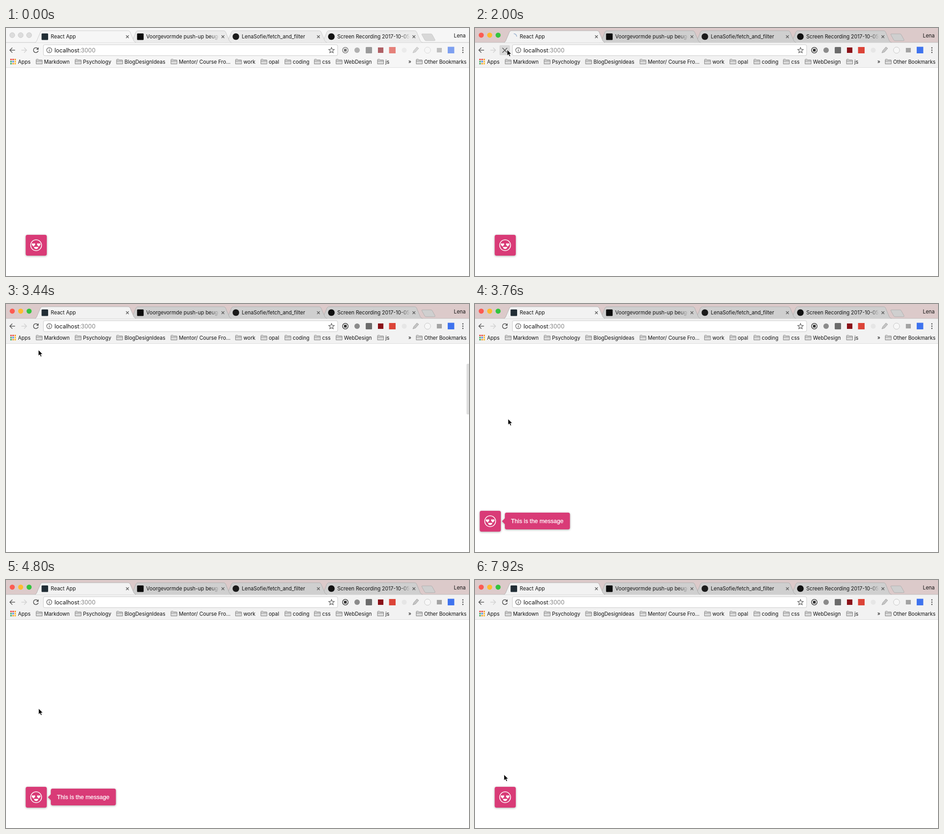
Recreate the animation shown at these times as an HTML page. Size 1022 px wide and 548 px high, loop 8 s.

```html
<!DOCTYPE html>
<html lang="en">
<head>
<meta charset="utf-8">
<title>React App</title>
<style>
  html, body { margin: 0; width: 100%; height: 100%; overflow: hidden; background: #fff; }
  svg { display: block; width: 1022px; height: 548px; }
  text { font: 11.35px Inter, Roboto, sans-serif; fill: #111; white-space: pre; }
  #strip { fill: #dccaca; }
  .tab { fill: #cfcfcf; stroke: #a6a6a6; stroke-width: .8; }
  .tab.on, #bar { fill: #f2f2f2; }
  .fade { stop-color: #cfcfcf; }
  .blur #strip { fill: #f6f6f6; }
  .blur .tab { fill: #ebebeb; stroke: #c2c2c2; }
  .blur .tab.on, .blur #bar { fill: #f6f6f6; }
  .blur .fade { stop-color: #ebebeb; }
  .blur .light { fill: #dcdcdc; stroke: #cbcbcb; }
  .blur #newTab { fill: #d8d8d8; }
  .blur #tools { opacity: .65; }
  .line { fill: none; stroke: #5a5a5a; stroke-width: 1.6; }
  .pink { fill: #d93b77; }
  #widget { filter: drop-shadow(0 1px 2px rgba(0, 0, 0, .35)); }
  #message text { font: 13px "Liberation Sans", Arial, sans-serif; fill: #fff; stroke: #fff; stroke-width: .3px; }
</style>
</head>
<body>
<svg id="stage" viewBox="0 0 1022 548">
  <defs>
    <linearGradient id="fadeOut">
      <stop class="fade" offset="0" stop-opacity="0"/>
      <stop class="fade" offset="1"/>
    </linearGradient>
    <path id="heart" d="M0 4.2C-2 2.4-3.8 .9-3.8-.9C-3.8-3.2-1-3.7 0-1.6C1-3.7 3.8-3.2 3.8-.9C3.8 .9 2 2.4 0 4.2Z" fill="#fff"/>
  </defs>
  <rect width="1022" height="548" fill="#fff"/>

  <rect id="strip" width="1022" height="32"/>
  <rect id="bar" y="32" width="1022" height="55"/>
  <path d="M0 32H1022" stroke="#b4b4b4" stroke-width=".8"/>
  <path d="M0 87.5H1022" stroke="#dedede"/>
  <g id="lights"></g>
  <g id="tabs"></g>
  <path id="newTab" class="tab" d="M919 13H938Q940 13 941 15L947 26Q948 28 945 28H927Q925 28 924 26L918 15Q917 13 919 13Z"/>
  <text x="988.5" y="20.5">Lena</text>

  <path class="line" d="M20 49H9M14 43.5L8.5 49L14 54.5"/>
  <path class="line" d="M34 49H45M40 43.5L45.5 49L40 54.5" style="stroke:#d2d2d2"/>
  <rect id="hover" x="54" y="38" width="23" height="22" rx="2.5" fill="#d9d9d9"/>
  <g id="reload">
    <path class="line" d="M70.2 45.5A5.4 5.4 0 1 0 71.2 50.2"/>
    <path d="M72 42.5V48H66.5Z" fill="#5a5a5a"/>
  </g>
  <path id="stop" class="line" d="M60.5 44L71 54.5M71 44L60.5 54.5"/>
  <rect x="82.5" y="37" width="649.5" height="24" rx="3" fill="#fff" stroke="#c9c9c9"/>
  <circle class="line" cx="95.5" cy="49" r="5.6" style="stroke-width:1.2"/>
  <path class="line" d="M95.5 48V52.2M95.5 45.6V47" style="stroke-width:1.4"/>
  <text x="107" y="53.6" style="font-size:12.8px">localhost<tspan fill="#808080">:3000</tspan></text>
  <path class="line" d="M718.5 43L720.2 47.2L724.6 47.5L721.2 50.4L722.3 54.8L718.5 52.4L714.7 54.8L715.8 50.4L712.4 47.5L716.8 47.2Z" style="stroke-width:1.2"/>

  <g id="tools">
    <circle cx="749" cy="49" r="6.2" fill="none" stroke="#444" stroke-width="1.5"/>
    <rect x="746" y="46" width="6" height="6" rx="1" fill="#333"/>
    <circle cx="775" cy="49" r="6" fill="#8b8b8b"/>
    <rect x="794" y="42" width="14" height="14" rx="1.5" fill="#6b6b6b"/>
    <rect x="821" y="43" width="12" height="12" fill="#8a1118"/>
    <rect x="845.5" y="42" width="14.5" height="14" fill="#dc4438"/>
    <circle cx="879" cy="49" r="5.5" fill="#e6e6e6"/>
    <path d="M898 55L900 50L907 42L911 45L904 53Z" fill="#c4c4c4" stroke="#999" stroke-width=".8"/>
    <circle cx="930.5" cy="49" r="6.8" fill="#f7f7f7" stroke="#c6c6c6"/>
    <rect x="951" y="44" width="11" height="10" fill="#a3a3a3"/>
    <rect x="975" y="41.5" width="14.5" height="14.5" fill="#3f73ee"/>
  </g>
  <path d="M1008.5 44V44.1M1008.5 49V49.1M1008.5 54V54.1" stroke="#555" stroke-width="2.8" stroke-linecap="round"/>
  <g id="bookmarks"></g>

  <g id="widget">
    <rect class="pink" x="43.5" y="457" width="46.5" height="46" rx="4"/>
    <circle cx="66.5" cy="480" r="12" fill="none" stroke="#fff" stroke-width="1.7"/>
    <use href="#heart" x="60.7" y="478.7"/>
    <use href="#heart" x="72.3" y="478.7"/>
    <path d="M61.7 483.8H71.3C71 490 62 490 61.7 483.8Z" fill="#fff"/>
    <g id="message">
      <rect class="pink" x="99" y="461" width="143.5" height="37" rx="4"/>
      <path class="pink" d="M92.5 480L99.5 473V487Z"/>
      <text x="112.6" y="484.4">This is the message</text>
    </g>
  </g>
  <rect id="scroll" x="1016.5" y="132" width="8" height="112" rx="2.5" fill="#7c7c7c"/>
  <path id="spinner" d="M85.5 12.5A6.5 6.5 0 0 1 92 19" fill="none" stroke="#9fb4d0" stroke-width="1.7"/>
  <path id="cursor" d="M0 0V13L3 10.3L5 15L7.3 14L5.3 9.5H9.3Z" fill="#000" stroke="#fff" stroke-width=".8"/>
</svg>
<script>
const $ = id => document.getElementById(id);
const clamp = u => Math.min(1, Math.max(0, u));
const smooth = u => u * u * (3 - 2 * u);
const out = u => 1 - (1 - u) ** 2;
const hold = () => 0;
const show = (id, opacity) => $(id).style.opacity = +opacity;
const move = (id, x, y) => $(id).setAttribute('transform', `translate(${x} ${y})`);

$('lights').innerHTML = ['#fc5b52', '#fdbb30', '#33c43f'].map((c, i) =>
  `<circle class="light" cx="${13.8 + i * 18.6}" cy="15.8" r="5.6" fill="${c}"/>`).join('');

const square = fill => `<rect x="14.5" y="12" width="14.5" height="14.5" rx="1.5" fill="${fill}"/>`;
const disc = fill => `<circle cx="21.8" cy="19" r="7.3" fill="${fill}"/>`;
const tabs = [
  ['React App', square('#222e36')],
  ['Voorgevormde push-up beuge', square('#0c0c0c')],
  ['LenaSofie/fetch_and_filter', disc('#1b1b1b')],
  ['Screen Recording 2017-10-05', disc('#111')]
];
$('tabs').innerHTML = tabs.map(([label, icon], i) => `
  <g transform="translate(${64 + i * 210.8} 0)">
    <path class="tab ${i ? '' : 'on'}" d="M0 32Q3 31 4 28L12 9Q13.5 6 16 6H206Q208.500 6 210 9L218 28Q219.500 31 223 32"/>
    <g ${i ? '' : 'id="favicon"'}>${icon}</g>
    <svg x="34.800" width="160" height="32"><text y="23.200">${label}</text></svg>
    ${i % 2 ? '<rect x="176" y="9" width="19.500" height="20" fill="url(#fadeOut)"/>' : ''}
    <path class="line" d="M201 16.200L207 22.200M207 16.200L201 22.200" style="stroke-width:1.400"/>
  </g>`).reverse().join('');

const folders = [[66, 'Markdown'], [152, 'Psychology'], [243.500, 'BlogDesignIdeas'],
  [363.500, 'Mentor/ Course Fro...'], [506, 'work'], [562, 'opal'], [615, 'coding'],
  [680, 'css'], [728, 'WebDesign'], [819.500, 'js'], [905, 'Other Bookmarks']];
const dots = ['#e8453c', '#e8453c', '#f29a2e', '#3aa757', '#4285f4', '#f9bb2d', '#3aa757', '#f29a2e', '#f9bb2d'];
$('bookmarks').innerHTML =
  dots.map((c, i) => `<rect x="${9.5 + i % 3 * 4.6}" y="${68 + (i / 3 | 0) * 4.6}" width="3.2" height="3.2" fill="${c}"/>`).join('') +
  '<text x="26.500" y="78.700">Apps</text><text x="888" y="78">»</text>' +
  folders.map(([x, label]) => `
    <path d="M${x + .5} 79.500V70.500Q${x + .5} 69 ${x + 2} 69H${x + 5}L${x + 6.5} 70.500H${x + 13}Q${x + 14} 70.500 ${x + 14} 72V79.500ZM${x + .5} 73H${x + 14}" fill="#dadada" stroke="#777" stroke-width=".9"/>
    <text x="${x + 18}" y="78.700">${label}</text>`).join('');

// time, x, y, easing towards the next stop
const path = [
  [320, -6, 150, smooth], [1120, 71, 48, hold], [3280, 71, 48, smooth],
  [3760, 73, 254, out], [4080, 73, 284, hold], [4720, 72.5, 284, hold],
  [4800, 72, 284, hold], [6800, 71.5, 284, hold], [7440, 71.5, 284, smooth], [7920, 64, 430, hold]
];

function moveCursor(t) {
  show('cursor', t >= 320);
  const i = Math.max(0, path.findLastIndex(p => p[0] <= t));
  const [t0, x, y, ease] = path[i], [t1, nx, ny] = path[i + 1] || [t0 + 1, x, y];
  const u = ease(clamp((t - t0) / (t1 - t0)));
  move('cursor', x + (nx - x) * u, y + (ny - y) * u);
}

function draw(t) {
  const loading = t >= 2000 && t < 3280;
  const spinning = t >= 2000 && t < 2560;
  $('stage').classList.toggle('blur', t < 2000);
  show('hover', spinning);
  show('reload', !loading);
  show('stop', loading && (spinning ? 1 : .2));
  show('spinner', spinning);
  show('favicon', !spinning);
  $('spinner').setAttribute('transform', `rotate(${(t - 2000) * .36} 85.5 19)`);
  show('scroll', t >= 2560 && 1 - clamp((t - 3200) / 320));

  show('widget', t < 2320 || t >= 3520);
  const slide = t < 3520 ? 0 : 264 * (1 - clamp((t - 3520) / 480)) ** 3;
  move('widget', -slide, 0);
  show('message', t >= 3520 && 1 - clamp((t - 7360) / 320));
  moveCursor(t);
}

const start = performance.now();
function tick() {
  const t = (performance.now() - start) % 8000;
  draw(Math.floor(t / 80) * 80);
  requestAnimationFrame(tick);
}
tick();
</script>
</body>
</html>
```
